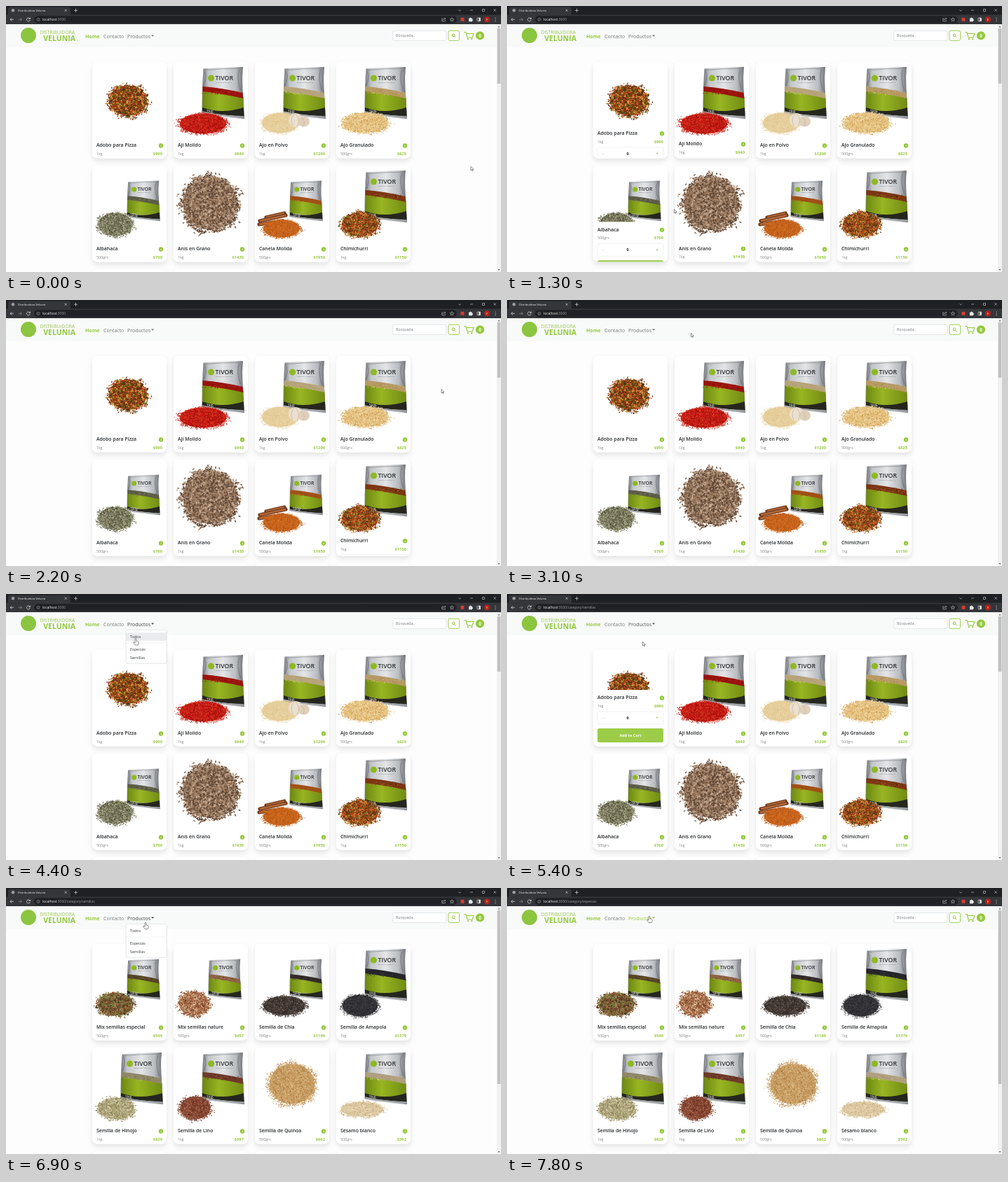
Animation of 706x380 px, one loop 8000 ms. Source, as an HTML page:

```html
<!DOCTYPE html>
<html lang="es">
<head>
<meta charset="utf-8">
<title>Distribuidora Velunia</title>
<style>
html, body { margin: 0; width: 100%; height: 100%; overflow: hidden; background: #fdfdfd; }
svg { display: block; width: 706px; height: 380px; font-family: "Open Sans", "Noto Sans", sans-serif; }
.card { filter: drop-shadow(0 4px 3.5px rgba(0, 0, 0, .1)); }
</style>
</head>
<body>
<svg id="stage" viewBox="0 0 706 380"></svg>
<script>
const GREEN = '#95c93d', LOOP = 8000, STEP = 100, LIFT = 51, FADE = 400;

// ---------- drawing helpers ----------
let seed = 7;
const rnd = () => {
  seed = seed + 0x6D2B79F5 | 0;
  let t = Math.imul(seed ^ seed >>> 15, 1 | seed);
  t = t + Math.imul(t ^ t >>> 7, 61 | t) ^ t;
  return ((t ^ t >>> 14) >>> 0) / 4294967296;
};
// y is the middle of the line of text
const text = (x, y, s, size, fill, weight = 400, anchor = 'start') =>
  `<text x="${x}" y="${y + size * .36}" font-size="${size}" fill="${fill}" font-weight="${weight}" text-anchor="${anchor}">${s}</text>`;
const rect = (x, y, w, h, fill, r = 0, extra = '') =>
  `<rect x="${x}" y="${y}" width="${w}" height="${h}" rx="${r}" fill="${fill}" ${extra}/>`;
const circle = (x, y, r, fill, extra = '') => `<circle cx="${x}" cy="${y}" r="${r}" fill="${fill}" ${extra}/>`;
const line = (d, color, w = 1, extra = '') => `<path d="${d}" fill="none" stroke="${color}" stroke-width="${w}" ${extra}/>`;
const shape = (d, fill) => `<path d="${d}" fill="${fill}"/>`;

// ---------- products: name, weight, price, bag, pile [cx, cy, rx, ry, grain length], colours ----------
const BIG = 1, SMALL = 2;
const pages = [[
  ['Adobo para Pizza', '1kg', 990, 0, [51, 55, 30, 24, 2.4], '#8f3a14 #cf451b #66791f #dd9c48 #4d2b14'],
  ['Ají Molido', '1kg', 940, BIG, [42, 88, 37, 16, 1.7], '#c01812 #e0261a #8d0d0b #e2452a'],
  ['Ajo en Polvo', '1kg', 1200, BIG, [36, 87, 29, 16, 1.2], '#e5cc98 #ecd8aa #dcc088 #f0e0b8'],
  ['Ajo Granulado', '500grs', 825, BIG, [42, 87, 36, 16, 2], '#e4bf7c #f5e2b6 #c99a54 #ecd092'],
  ['Albahaca', '500grs', 760, SMALL, [33, 84, 27, 18, 2], '#74745a #43442e #a09f80 #5d6040 #bcb79a'],
  ['Anís en Grano', '1kg', 1430, 0, [52, 54, 43, 42, 3], '#a3846a #785a44 #cab099 #8d6e55 #5e4635'],
  ['Canela Molida', '500grs', 1950, SMALL, [38, 90, 29, 14, 1.5], '#c8641c #dd7a2b #a04a12 #d06c20'],
  ['Chimichurri', '1kg', 1150, BIG, [34, 84, 29, 19, 2.2], '#9c4218 #d0551e #72782a #d9963f #552a12'],
], [
  ['Mix semillas especial', '500grs', 549, SMALL, [33, 86, 28, 18, 2.2], '#6c5632 #362a1c #b59a66 #8a3f28 #7f8440'],
  ['Mix semillas nature', '500grs', 457, SMALL, [29, 85, 24, 19, 2.2], '#b07c56 #74391f #e4c3a0 #95583a'],
  ['Semilla de Chia', '500grs', 1160, SMALL, [42, 88, 33, 15, 1.8], '#3e3531 #221d1b #75675d #4d413a'],
  ['Semilla de Amapola', '1kg', 1379, BIG, [34, 88, 28, 17, 1.5], '#303034 #1e1e21 #505057 #3a3a3f'],
  ['Semilla de Hinojo', '1kg', 829, BIG, [34, 87, 28, 17, 2.2], '#b4a880 #82794e #d8cfae #9c9a6a'],
  ['Semilla de Lino', '1kg', 597, BIG, [31, 86, 24, 18, 2], '#8a4934 #5f2a1c #b4745a #7a3e2a'],
  ['Semilla de Quinoa', '500grs', 602, 0, [53, 52, 36, 32, 1.8], '#c79c62 #e3c594 #a5763c #d2aa70'],
  ['Sésamo blanco', '500grs', 592, BIG, [37, 88, 33, 12, 1.8], '#dcc7a0 #efe2c6 #c3a677 #e2d0aa'],
]];

// Scatters short grains inside a ragged ellipse, a few of them just outside it.
function grains(n, [cx, cy, rx, ry, size], colors) {
  const paths = colors.map(() => ''), phase = rnd() * 6;
  for (let i = 0; i < n; i++) {
    const a = rnd() * 6.283, edge = 1 + .035 * Math.sin(5 * a + phase) + .025 * Math.sin(11 * a);
    const r = edge * (rnd() < .025 ? 1 + rnd() * .12 : Math.sqrt(rnd()));
    const x = cx + rx * r * Math.cos(a), y = cy + ry * r * Math.sin(a), b = rnd() * 3.14;
    paths[i % colors.length] += `M${x.toFixed(1)} ${y.toFixed(1)}l${(size * Math.cos(b)).toFixed(1)} ${(size * Math.sin(b)).toFixed(1)}`;
  }
  return paths.map((d, i) => line(d, colors[i], size * .48)).join('');
}

function pile(box, colors) {
  const [cx, cy, rx, ry, size] = box;
  return `<ellipse cx="${cx}" cy="${cy}" rx="${rx * .9}" ry="${ry * .9}" fill="${colors[0]}"/>` +
    grains(Math.round(rx * ry * 3 / size) + 60, box, colors);
}

function bag(kind, colors) {
  const place = kind === BIG ? 'translate(38.5 7)' : 'translate(48 21.5) scale(.78)';
  const strip = 'M3 28Q30 30 60 37L61 45Q30 38 3 35z';
  return `<g transform="${place}">` +
    shape('M4 2.500Q30 0 60.500 0Q59 14 60 30L62.500 74Q40 73 14 69L2 66Q2 30 4 2.500z', 'url(#silver)') +
    line('M4 4.800Q30 2 60 2.500', '#77797d', .6) +
    line('M55 4Q51 16 57 33M6 6Q10 16 4 27', '#5d6064', 1.6, 'opacity=".4"') +
    shape('M3 34Q30 36 61 44L61.500 62Q30 65 2.500 61z', 'url(#leaf)') +
    shape(strip, colors[0]) + grains(60, [31, 36, 26, 3, 1.6], colors) + shape(strip, '#0003') +
    shape('M2.500 58Q30 68 61.500 58L62 70Q40 70 14 66L2.500 63z', '#25271f') +
    line('M3 65Q30 70 62 72', '#9fa2a5', 2) +
    circle(15, 16, 4.6, '#8fb822') +
    text(21, 15.5, 'TIVOR', 8.8, '#2c2f32', 600) +
    text(21.5, 22, 'ESPECIAS &amp; SEMILLAS', 2.3, '#6a6d70') +
    text(8, 63, kind === BIG ? '1kg.' : '500gr', 5.6, '#c9ccbd', 600) + '</g>';
}

const garlic = '<ellipse cx="58" cy="83" rx="10" ry="10" fill="#ebdfcf"/><ellipse cx="70" cy="85" rx="8" ry="7.500" fill="#e0d0ba"/>' +
  line('M54 91Q49 82 56 74M60 92Q66 83 58 74M68 92Q74 86 66 79', '#c4b19a', .7);
const sticks = ['M16 74L42 68', 'M7 79L44 71', 'M6 84L40 79'].map(d =>
  line(d, '#74381a', 5.2, 'stroke-linecap="round"') + line(d, '#b06a3c', 2.4)).join('');

function card([name, weight, price, kind, box, list], i) {
  const colors = list.split(' ');
  return `<g transform="translate(${123 + i % 4 * 116} ${80 + (i >> 2) * 148})">` +
    rect(0, 0, 106, 137.5, '#fff', 7, 'class="card"') + '<g clip-path="url(#frame)">' +
    (kind ? bag(kind, colors) : '') +
    (name.startsWith('Canela') ? sticks : '') + pile(box, colors) +
    (name === 'Ajo en Polvo' ? garlic : '') +
    '<g class="info">' + rect(0, 108, 106, 90, '#fff') +
    text(6, 118.7, name, 6.9, '#25282b', 600) +
    circle(98, 119.5, 3.2, GREEN) + text(98, 119.5, 'i', 4, '#fff', 700, 'middle') +
    text(6, 131, weight, 5.4, '#444', 300) +
    text(100, 131, '$' + price, 5.8, GREEN, 700, 'end') +
    rect(6, 139, 94, 18, '#fff', 2, 'stroke="#e6e8ea" stroke-width=".6"') +
    text(14, 148, '-', 6, GREEN, 600, 'middle') + text(49, 148, '0', 5.6, '#222', 700, 'middle') +
    text(91, 148, '+', 6.5, GREEN, 600, 'middle') +
    rect(6, 163, 94, 20, '#9ccc48', 2.5) +
    text(53, 173, 'Add to Cart', 5.5, '#fff', 700, 'middle') + '</g></g></g>';
}

// ---------- static parts ----------
const defs = `<defs><clipPath id="frame">${rect(0, 0, 106, 137.5, '#fff', 7)}</clipPath>
<linearGradient id="silver"><stop stop-color="#73767a"/><stop offset=".15" stop-color="#c3c6c9"/><stop offset=".5" stop-color="#e3e5e7"/><stop offset=".8" stop-color="#b9bcc0"/><stop offset="1" stop-color="#65686c"/></linearGradient>
<linearGradient id="leaf"><stop stop-color="#6c8712"/><stop offset=".4" stop-color="#98b522"/><stop offset="1" stop-color="#718c13"/></linearGradient></defs>`;

const pale = '#d5d7da';
const browser = rect(0, 0, 706, 13, '#1f2023') + rect(3, 1.5, 89, 15, '#35363a', 3) + rect(0, 12.5, 706, 13.5, '#35363a') +
  circle(10, 6.3, 2.3, '#9a9da1') + text(17, 6.3, 'Distribuidora Velunia', 4, '#f1f3f4') +
  line('M83.700 4.800l3 3m0 -3l-3 3M97 6.300h5m-2.500 -2.500v5', pale, .7) +
  line('M645.500 5.500l1.700 1.700l1.700 -1.700M662 6h4M679.500 4.500h3v3h-3zM695.500 4.300l3.400 3.400m0 -3.400l-3.400 3.400', pale, .6) +
  line('M11 19.300h-5m2.200 -2.200l-2.200 2.200l2.200 2.200M34 18a2.500 2.500 0 1 0 .3 2M34.500 16.500v2h-2', pale, .8) +
  line('M17.500 19.300h5m-2.200 -2.200l2.200 2.200l-2.200 2.200', '#85888c', .8) +
  rect(40, 14.3, 603, 10.2, '#202124', 5.1) +
  circle(46, 19.3, 2, 'none', 'stroke="#aaa" stroke-width=".6"') + line('M46 19v1.300', '#aaa', .6) +
  `<text x="52" y="21" font-size="4.9" fill="#f1f3f4">localhost<tspan id="url" fill="#9aa0a6"></tspan></text>` +
  line('M623.500 18h-1.700v3.700h4.500v-1.500M623.500 20q.5 -2 3 -2m-1 -1.300l1.300 1.300l-1.300 1.300', pale, .6) +
  line('M636 16.500l.8 1.900l2 .1l-1.600 1.300l.6 2l-1.800 -1.100l-1.800 1.100l.6 -2l-1.600 -1.300l2 -.1z', pale, .5) +
  rect(648.5, 16.8, 5, 5, '#d93a2f', .6) +
  shape('M660 17.500h1.500a1 1 0 0 1 2 0h1.500v1.500a1 1 0 0 1 0 2v1.300h-5z', '#e4e6e8') +
  rect(672, 17, 4.6, 4.6, 'none', .5, 'stroke="#e4e6e8" stroke-width=".7"') + rect(674.3, 17, 2.3, 4.6, '#e4e6e8') +
  circle(686, 19.3, 4, '#b3261e') + text(686, 19.3, 'F', 4, '#fff', 400, 'middle') +
  [17, 19.3, 21.6].map(y => circle(698, y, .55, pale)).join('');

const nav = rect(0, 26, 700, 33, '#f8faf9') + circle(32, 42, 11, '#8cc540') +
  text(98, 37.3, 'DISTRIBUIDORA', 6.7, '#9bc658', 400, 'end') +
  text(99, 46.7, 'VELUNIA', 10.5, '#92c83e', 700, 'end') +
  text(113, 43, 'Home', 7, GREEN, 700) + text(139, 43, 'Contacto', 7, '#777a7c') +
  `<g id="link">${text(173, 43, 'Productos', 7, 'currentColor')}${shape('M207 41.500h4.200l-2.100 2.300z', 'currentColor')}</g>` +
  rect(551.8, 35.3, 76, 14, '#fff', 2, 'stroke="#ced4da" stroke-width=".6"') +
  text(556, 42.3, 'Búsqueda..', 5.2, '#777b80') +
  rect(631, 35.3, 15.5, 14, '#fff', 2, `stroke="${GREEN}" stroke-width=".9"`) +
  circle(638.2, 41.8, 1.9, 'none', `stroke="${GREEN}"`) + line('M639.600 43.200l2 2', GREEN) +
  line('M653.500 37.500h2.500l2 7.500h7l2 -5.500h-10', GREEN, 1.1) +
  circle(658.8, 47.2, 1.1, GREEN) + circle(664.3, 47.2, 1.1, GREEN) +
  circle(676, 42.3, 6.1, GREEN) + text(676, 42.3, '0', 6.2, '#fff', 700, 'middle');

const items = [['Todos', 61], ['Especias', 79], ['Semillas', 91]];
const menu = '<g id="menu">' + rect(171, 51.3, 58.3, 48, '#fff', 2, 'stroke="#d3d5d7" stroke-width=".6"') +
  rect(171.3, 0, 57.7, 11.6, '#e9ebee', 0, 'id="mark"') + line('M171.300 70h57.700', '#dfe1e3', .5) +
  items.map(([s, y]) => text(177, y, s, 5.5, '#33373b')).join('') + '</g>';

const scrollbar = rect(700, 26, 6, 354, '#f1f1f1') + rect(700.7, 32, 4.6, 79, '#c1c1c1', 0, 'id="thumb"') +
  shape('M701.500 30.500h3l-1.500 -2zM701.500 376h3l-1.500 2z', '#666');

const outline = 'fill="#fff" stroke="#444" stroke-width=".6" stroke-linejoin="round"';
const pointer = `<g id="pointer"><path id="arrow" d="M0 .3v5.600l1.300 -1.100l.9 1.900l.8 -.4l-.8 -1.800h1.800z" ${outline}/>
<path id="hand" d="M-.9 .6a.9 .9 0 0 1 1.800 0v2.800q1.500 -.5 1.700 .5q1.500 -.3 1.500 1v2l-1 2.100h-4l-2.500 -3.500q0 -1.300 1.200 -.8l1.300 1z" ${outline}/></g>`;

const nextRow = [0, 1, 2, 3].map(i => rect(123 + i * 116, 376, 106, 137, '#fff', 7, 'class="card"')).join('');
const $ = id => document.getElementById(id);
$('stage').innerHTML = defs + rect(0, 0, 706, 380, '#fdfdfd') + nextRow +
  pages.map((p, i) => `<g id="page${i}">${p.map(card).join('')}</g>`).join('') +
  nav + menu + scrollbar + browser + pointer;

// ---------- motion ----------
// pointer path: time, x, y
const path = [
  [0, 663, 229], [600, 663, 229], [760, 540, 170], [1080, 175, 150], [1250, 175, 290], [1400, 365, 290],
  [1717, 466, 272], [1924, 577, 238], [2200, 621, 127], [2400, 621, 127], [2700, 560, 66], [3200, 188, 42],
  [3300, 183, 40.5], [3800, 183, 40.5], [3900, 181.5, 40.5], [4200, 181.5, 40.5], [4400, 185, 64],
  [4700, 187, 89], [5100, 187, 89], [5400, 193.5, 68], [5600, 200, 46], [5800, 204.5, 40.5], [6100, 204.5, 40.5],
  [6200, 203, 40.5], [6800, 203, 40.5], [7200, 187, 77], [7500, 187, 77], [7700, 203, 40.5], [8000, 203, 40.5]];
// hovered cards: index, enter, leave
const hovers = [[3, 700, 800], [2, 810, 900], [1, 910, 1000], [0, 1010, 1150], [4, 1170, 1280],
  [5, 1290, 1370], [6, 1385, 1712], [7, 1722, 1924], [0, 4900, 5400]];

const within = (t, a, b) => t >= a && t < b;

// cubic-bezier(.25, .1, .25, 1)
function ease(x) {
  if (x <= 0) return 0;
  if (x >= 1) return 1;
  let lo = 0, hi = 1, s;
  for (let i = 0; i < 20; i++) {
    s = (lo + hi) / 2;
    if (.75 * s * (1 - s) + s ** 3 < x) lo = s; else hi = s;
  }
  return .3 * s * (1 - s) ** 2 + 3 * s * s * (1 - s) + s ** 3;
}

function pointerAt(t) {
  const i = path.findIndex(p => p[0] > t), [a, x, y] = path[i - 1], [b, u, v] = path[i], k = (t - a) / (b - a);
  return [x + (u - x) * k, y + (v - y) * k];
}

const infos = document.querySelectorAll('#page0 .info');
const show = (id, on) => $(id).setAttribute('visibility', on ? 'visible' : 'hidden');

function draw(t) {
  const [x, y] = pointerAt(t), open = within(t, 4200, 4900) || within(t, 6800, 7300);
  const second = t >= 5800, onLink = within(x, 171, 213) && within(y, 34, 51);

  $('page0').style.display = second ? 'none' : '';
  $('page1').style.display = second ? '' : 'none';
  $('thumb').setAttribute('height', second ? 248 : 79);
  $('url').textContent = ':3000' + (t < 4900 ? '' : t < 7300 ? '/category/semillas' : '/category/especias');

  const lift = Array(8).fill(0);
  for (const [i, a, b] of hovers) lift[i] += LIFT * ease((t - a) / FADE) * (1 - ease((t - b) / FADE));
  infos.forEach((el, i) => el.setAttribute('transform', `translate(0 ${-lift[i]})`));

  $('link').style.color = open ? '#3f4245' : onLink ? GREEN : t < 4200 ? '#6f7275' : '#505356';
  show('menu', open);
  const item = items.find(([, m]) => Math.abs(y - m) < 6);
  $('mark').setAttribute('y', item ? item[1] - 5.8 : 0);
  show('mark', open && item);

  const hand = open || onLink, seen = !within(t, 1750, 1850);
  show('hand', seen && hand);
  show('arrow', seen && !hand);
  $('pointer').setAttribute('transform', `translate(${x} ${y})`);
}

function tick() {
  draw(Math.floor(performance.now() % LOOP / STEP) * STEP);
  requestAnimationFrame(tick);
}
tick();
</script>
</body>
</html>
```
